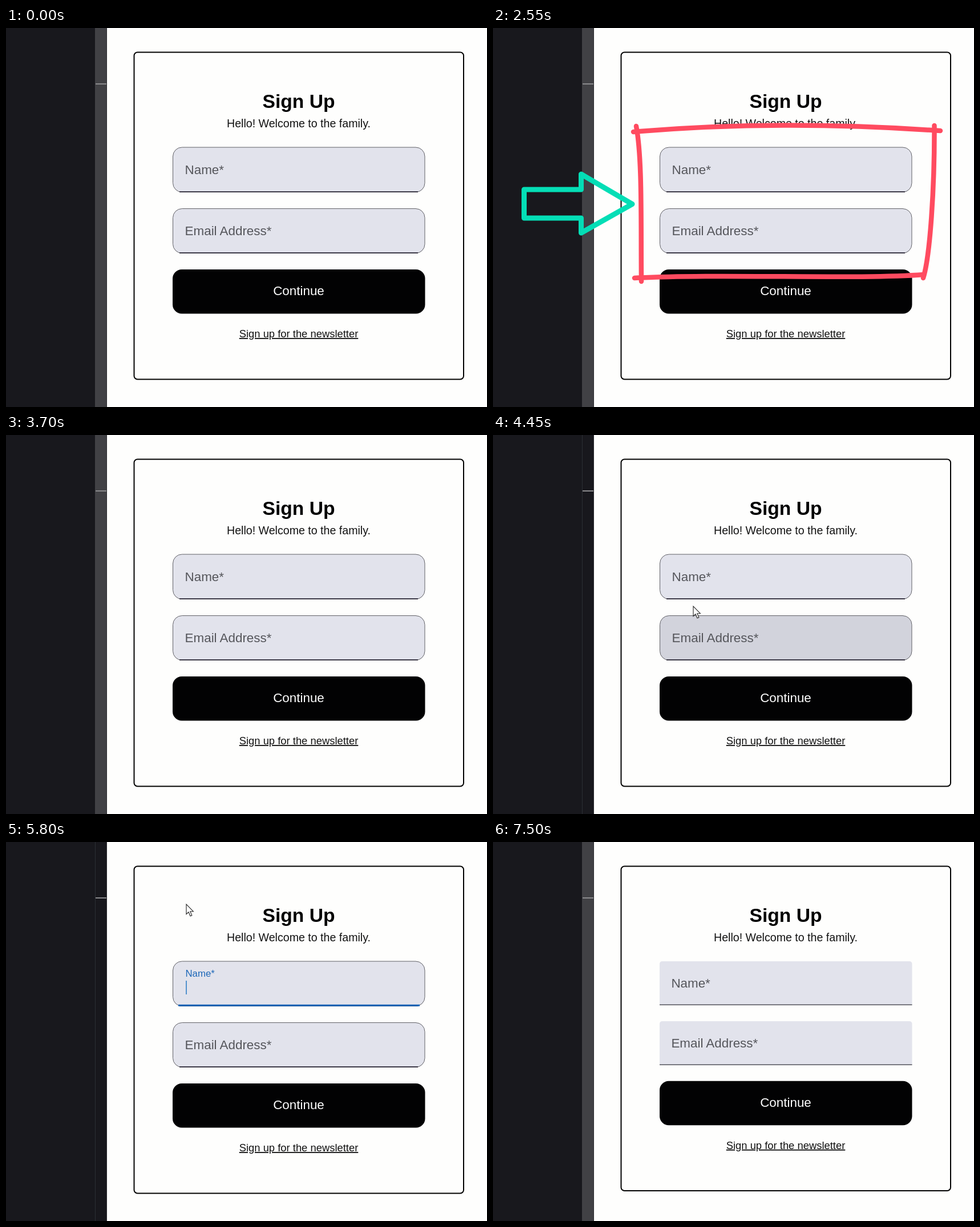
Recreate the animation shown at these times as an HTML page. Size 843x664 px, loop 7.55 s.

```html
<!DOCTYPE html>
<html lang="en">
<head>
<meta charset="utf-8">
<title>Sign-up form styling</title>
<style>
  html, body { margin: 0; height: 100%; overflow: hidden; background: #fefefd; }
  svg { display: block; width: 843px; height: 664px; font: 22.4px "Liberation Sans", Arial, sans-serif; }
  .mid { text-anchor: middle; }
  .label { fill: #55565b; }
  .ink { fill: none; stroke-linecap: round; stroke-linejoin: round; }
</style>
</head>
<body>
<svg viewBox="0 0 843 664">
  <rect width="843" height="664" fill="#fefefd"/>
  <rect width="157" height="664" fill="#18181d"/>
  <rect id="strip" x="156" width="21" height="664"/>
  <path id="edge" d="M156.5 0V664" stroke="#2b2e34"/>
  <path d="M176.5 0V664" stroke="#2c2c31"/>
  <path d="M157 98H176" stroke="#8b8b8e" stroke-width="2"/>

  <rect id="card" x="224.5" y="42.5" width="577.5" fill="none" stroke="#000" stroke-width="2" rx="6"/>
  <text class="mid" x="513" y="140" font-size="33.6" font-weight="bold">Sign Up</text>
  <text class="mid" x="513" y="174" font-size="19.6" fill="#111">Hello! Welcome to the family.</text>

  <g id="round">
    <g id="name">
      <rect x="292.5" y="209" width="441.5" height="78.5" rx="16" stroke="#606066"/>
      <path d="M304 287H722" stroke="#3c3947" stroke-width="1.8"/>
    </g>
    <g id="email">
      <rect x="292.5" y="316.5" width="441.5" height="78" rx="16" stroke="#606066"/>
      <path d="M304 394H722" stroke="#3c3947" stroke-width="1.8"/>
    </g>
    <path id="focusLine" d="M302 286.3H725" stroke="#1565b8" stroke-width="3"/>
    <path id="caret" d="M316 243V267" stroke="#2277c4" stroke-width="1.5"/>
    <text id="nameLabel">Name*</text>
    <text class="label" x="313.6" y="363">Email Address*</text>
  </g>

  <g id="square">
    <path id="box" d="M292 285.5V214Q292 209 297 209H729.5Q734.5 209 734.5 214V285.5" fill="#e2e3ec"/>
    <path id="rule" d="M292 285.3H734.5" stroke="#55555d" stroke-width="1.4"/>
    <use href="#box" y="105"/>
    <use href="#rule" y="105"/>
    <text class="label" x="312.4" y="255">Name*</text>
    <text class="label" x="312.4" y="360">Email Address*</text>
  </g>

  <g id="foot">
    <rect x="292" y="423" width="442.5" height="77.5" rx="16" fill="#020203"/>
    <text class="mid" x="513" y="468" fill="#fff">Continue</text>
    <text class="mid" x="513" y="542" font-size="18.4" fill="#111" text-decoration="underline">Sign up for the newsletter</text>
  </g>

  <g id="marks" class="ink">
    <g id="frame" stroke="#ff4b60" stroke-width="8.5">
      <path pathLength="1" d="M246 182Q500 160 784 180"/>
      <path pathLength="1" d="M773.5 171C774 280 766 400 754 438"/>
      <path pathLength="1" d="M755 432C640 441 400 430 248 438"/>
      <path pathLength="1" d="M251 172C262 230 259 340 260 444"/>
    </g>
    <path id="arrow" pathLength="1" stroke="#04deb6" stroke-width="9"
      d="M154.500 333V359L244 308.500L154.500 256V283H54.500V333H154.500"/>
  </g>

  <path id="cursor" d="M0 0V17.500L4 13.800L7 20.800L9.800 19.600L6.900 12.700H12.300Z" fill="#fff" stroke="#222" stroke-width="1.1"/>
</svg>

<script>
const LOOP = 7550;
const $ = id => document.getElementById(id);
const part = (t, a, b) => Math.min(1, Math.max(0, (t - a) / (b - a)));
const smooth = p => p * p * (3 - 2 * p);
const mix = (a, b, p) => a + (b - a) * p;
const blend = (a, b, p) => `rgb(${a.map((v, i) => mix(v, b[i], p))})`;
const show = (el, on) => el.style.display = on ? "" : "none";
// Rises after a, falls before b
const pulse = (t, a, b, fade) => part(t, a, a + fade) * (1 - part(t, b - fade, b));

// Time, x, y of the pointer tip
const route = [
  [4000, 430, 680], [4450, 351, 300], [4700, 345, 250],
  [5000, 345, 250], [5400, 316, 109]
];

function pointer(t) {
  let i = 0;
  while (i < route.length - 2 && t > route[i + 1][0]) i++;
  const [a, x, y] = route[i], [b, u, v] = route[i + 1];
  const p = smooth(part(t, a, b));
  return [mix(x, u, p), mix(y, v, p)];
}

function trim(path, p) {
  show(path, p > 0);
  path.style.strokeDasharray = p < 1 ? `${p} 2` : "none";
}

function drawMarks(t) {
  show($("marks"), t < 3200);
  [...$("frame").children].forEach((path, i) => {
    const start = 410 + 190 * i;
    trim(path, smooth(part(t, start, start + 200)));
  });
  trim($("arrow"), smooth(part(t, 900, 1650)));
  const fade = (1 - part(t, 2775, 3200)) ** 2;
  $("frame").style.opacity = $("arrow").style.opacity = fade;
}

function drawForm(t) {
  const square = t >= 7500;
  show($("round"), !square);
  show($("square"), square);
  $("card").setAttribute("height", square ? 568.5 : 573);
  $("foot").setAttribute("transform", `translate(0 ${square ? -4.3 : 0})`);

  const plain = [226, 227, 236], hover = [210, 211, 220];
  $("name").setAttribute("fill", blend(plain, hover, pulse(t, 4520, 5220, 80)));
  $("email").setAttribute("fill", blend(plain, hover, pulse(t, 4180, 4550, 80)));

  const focus = smooth(pulse(t, 4750, 6180, 170));
  const label = $("nameLabel");
  label.setAttribute("transform",
    `translate(${mix(313.6, 314.5, focus)} ${mix(256, 236, focus)}) scale(${1 - focus / 4})`);
  label.setAttribute("fill", blend([85, 86, 91], [28, 103, 184], focus));
  $("focusLine").style.opacity = focus;
  show($("caret"), t >= 4770 && t < 6000 && (t - 4770) % 1030 < 515);
}

function draw(t) {
  const dim = t >= 4000 && t < 7500;
  $("strip").setAttribute("fill", dim ? "#18181d" : "#414145");
  show($("edge"), dim);
  drawForm(t);
  drawMarks(t);
  show($("cursor"), dim);
  $("cursor").setAttribute("transform", `translate(${pointer(t)})`);
}

const start = performance.now();
function tick() {
  draw((performance.now() - start) % LOOP);
  requestAnimationFrame(tick);
}
tick();
</script>
</body>
</html>
```
